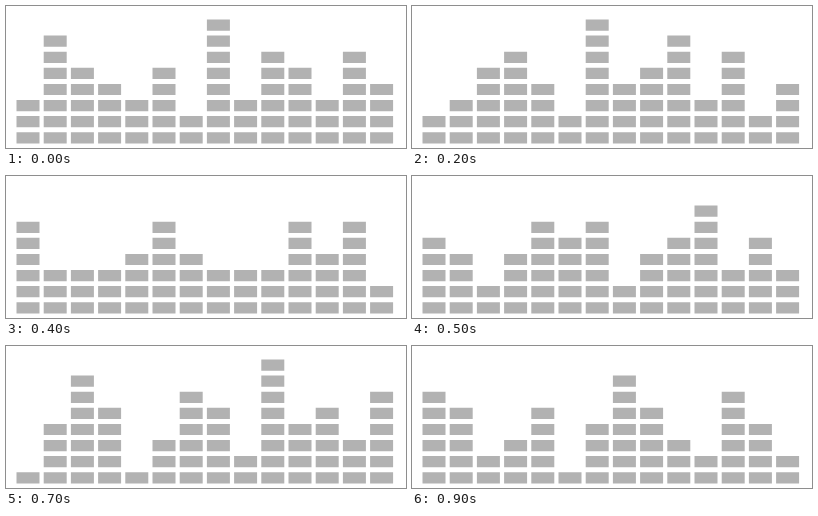
An HTML page that plays this animation: 400 px wide and 142 px high, repeating every 1000 ms.

```html
<!DOCTYPE html>
<html lang="en">
<head>
<meta charset="utf-8">
<title>Equalizer</title>
<style>
  html, body { margin: 0; width: 100%; height: 100%; overflow: hidden; background: #fff; }
  svg { display: block; width: 100%; height: 100%; }
</style>
</head>
<body>
<svg viewBox="0 0 400 142">
  <path id="bars" fill="#b2b2b2"/>
</svg>
<script>
const STEP = 100, ROWS = 8;
const LEFT = 10.5, TOP = 13.5;
const PITCH = { x: 27.2, y: 16.1 };
const BLOCK = { w: 23, h: 11.2 };

// Bar heights in blocks, one digit per column.
const LEVELS = [
  '37543528365364',
  '14751365284536',
  '23564284573624',
  '54246562457353',
  '63334643336462',
  '65235147532642'
];
// The levels run forward and back between the two ends.
const ORDER = [0, 1, 2, 3, 4, 3, 2, 1, 0, 5];

const bars = document.getElementById('bars');

function block(col, row) {
  const x = LEFT + col * PITCH.x;
  const y = TOP + (ROWS - 1 - row) * PITCH.y;
  return `M${x} ${y}h${BLOCK.w}v${BLOCK.h}h${-BLOCK.w}z`;
}

function outline(levels) {
  return [...levels].map((n, col) =>
    Array.from({ length: +n }, (_, row) => block(col, row)).join('')
  ).join('');
}

const shapes = LEVELS.map(outline);

function draw(ms) {
  const step = Math.floor(ms / STEP) % ORDER.length;
  bars.setAttribute('d', shapes[ORDER[step]]);
}

const start = performance.now();
function tick() {
  draw(performance.now() - start);
  requestAnimationFrame(tick);
}
tick();
</script>
</body>
</html>
```
